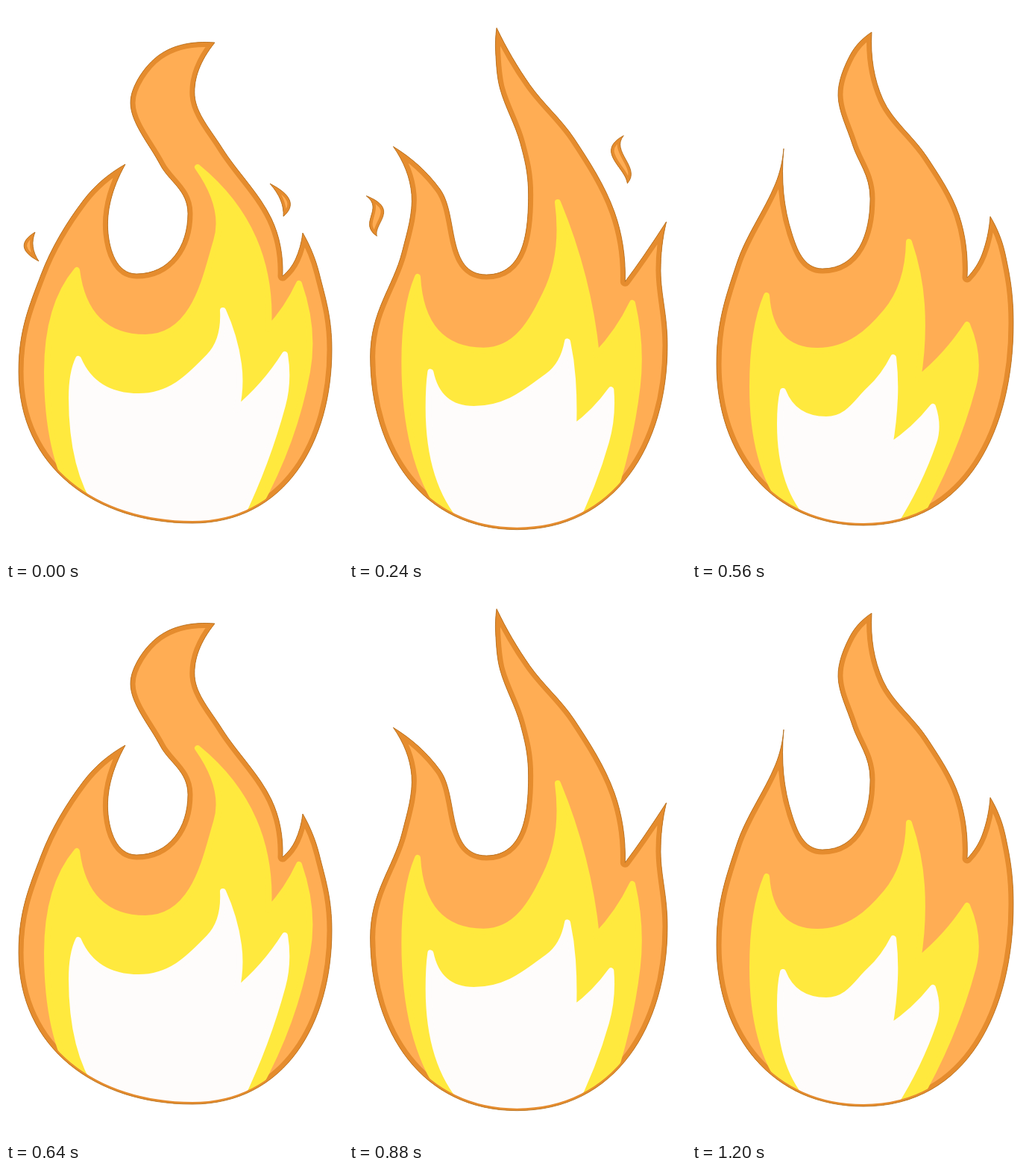
Recreate the animation shown at these times as an HTML page with a canvas. Size 452 px wide and 741 px high, loop 1.28 s.

```html
<!DOCTYPE html>
<html lang="en">
<head>
<meta charset="utf-8">
<title>Flame</title>
<style>
  html, body { margin: 0; width: 100%; height: 100%; overflow: hidden; background: #fff; }
  canvas { display: block; }
</style>
</head>
<body>
<canvas id="stage" width="452" height="741"></canvas>
<script>
const ctx = document.getElementById("stage").getContext("2d");
const STEP = 80, LOOP = 16, FLICKER = 8;
const ORANGE = "#ffad54", DARK = "#e58c2e", EDGE = "#b06c1f", YELLOW = "#ffe93e", WHITE = "#fefcfb";

// Key points "x,y" of a shape. "|" follows a sharp corner;
// "v" and "h" make the curve run vertically or horizontally there.
const parse = text => text.split("|").map(run => run.trim().split(/\s+/).map(token => {
  const [, axis, x, y] = token.match(/([vh]?)(\d+),(\d+)/);
  return { x: +x, y: +y, axis };
}));
const pose = (step, ...shapes) => ({ step, shapes: shapes.map(parse) });

// Body, yellow and white at the main moments of a flicker
const flame = [
  pose(0,
    `280,49 253,120 289,189 356,285 371,362 | 388,340 398,304
     | 420,358 v437,460 h250,693 v17,490 47,360 104,260 160,212
     | 137,305 h175,359 v244,278 207,213 167,130 205,66 280,49`,
    "93,662 v55,490 95,354 | h187,444 282,315 257,216 | 332,312 352,433 | 393,372 | 404,490 338,672",
    "126,675 v88,525 97,473 | h178,523 272,470 291,408 | 312,480 309,541 | 374,467 | 371,535 315,685"),
  pose(2,
    `228,16 245,116 300,187 356,285 371,376 | 393,341 418,282
     | 419,345 v426,440 h228,699 v31,460 70,335 88,255 80,185
     | 132,252 h190,366 v238,262 226,195 201,115 209,56 228,16`,
    "118,668 v70,455 87,355 | h186,464 264,385 280,247 | 320,350 338,462 | 382,389 | 388,500 350,672",
    "150,685 v103,530 105,485 | h165,535 269,493 296,442 | 305,492 308,563 | 361,511 | 351,580 296,700"),
  pose(5,
    `138,56 237,84 305,157 356,258 369,356 | 399,323 441,303
     | 416,375 v429,485 h220,707 v24,490 74,318 76,247 18,195
     | 102,232 h173,348 v246,235 237,160 206,103 172,73 138,56`,
    "140,700 v83,520 102,379 | h170,457 262,388 280,295 | 302,395 320,478 | 376,416 | 384,530 340,690",
    "165,705 v114,555 118,501 | h172,550 262,501 287,465 | 290,515 287,570 | 332,521 | 333,590 303,705"),
  pose(7,
    `241,35 256,125 315,202 358,280 369,364 | 389,333 400,282
     | 420,332 v431,425 h230,696 v33,480 60,345 112,238 123,191
     | 134,305 h175,352 v239,258 215,185 196,120 212,66 241,35`,
    "125,672 v81,510 100,388 | h168,462 260,410 291,316 | 308,400 303,500 | 369,427 | 377,510 296,700",
    "162,690 v118,560 122,516 | h180,554 238,514 270,471 | 272,525 265,590 | 323,537 | 324,585 266,702")
];

// Top and bottom of the right and the left spark
const sparks = [
  pose(0, "354,238 372,282", "39,303 44,342"),
  pose(2, "370,181 376,262", "25,260 42,327"),
  pose(5, "365,159 368,189", "19,243 28,271")
];

const mix = (a, b, k) => a + (b - a) * k;
const clamp = v => Math.max(-1, Math.min(1, v));

function shapesAt(poses, step) {
  const next = poses.findIndex(p => p.step >= step);
  if (next < 0) return [];
  const b = poses[next], a = poses[Math.max(0, next - 1)];
  const k = a === b ? 0 : (step - a.step) / (b.step - a.step);
  return a.shapes.map((shape, s) => shape.map((run, r) => run.map((p, i) => {
    const q = b.shapes[s][r][i];
    return { x: mix(p.x, q.x, k), y: mix(p.y, q.y, k), axis: p.axis };
  })));
}

const dist = (p, q) => Math.hypot(q.x - p.x, q.y - p.y);
const slope = (p, q, len = dist(p, q)) => ({ x: (q.x - p.x) / len, y: (q.y - p.y) / len });

function tangent(prev, p, next) {
  if (p.axis === "v") return { x: 0, y: 1.25 * Math.sign(next.y - prev.y) };
  if (p.axis === "h") return { x: 1.25 * Math.sign(next.x - prev.x), y: 0 };
  return slope(prev, next, dist(prev, p) + dist(p, next));
}

function addRun(path, pts) {
  const n = pts.length - 1;
  if (n === 1) { // slightly sagging line
    const [p, q] = pts;
    path.quadraticCurveTo((p.x + q.x) / 2 + (p.y - q.y) * 0.08,
      (p.y + q.y) / 2 + (q.x - p.x) * 0.08, q.x, q.y);
    return;
  }
  const tan = pts.map((p, i) => i > 0 && i < n ? tangent(pts[i - 1], p, pts[i + 1]) : null);
  const end = (u, t) => ({ x: 2 * u.x - t.x, y: 2 * u.y - t.y });
  tan[0] = end(slope(pts[0], pts[1]), tan[1]);
  tan[n] = end(slope(pts[n - 1], pts[n]), tan[n - 1]);
  for (let i = 0; i < n; i++) {
    const p = pts[i], q = pts[i + 1], h = dist(p, q) / 3;
    path.bezierCurveTo(p.x + tan[i].x * h, p.y + tan[i].y * h,
      q.x - tan[i + 1].x * h, q.y - tan[i + 1].y * h, q.x, q.y);
  }
}

function outline(shape) {
  const path = new Path2D(), first = shape[0][0];
  let last;
  path.moveTo(first.x, first.y);
  for (const run of shape) {
    addRun(path, last ? [last, ...run] : run);
    last = run[run.length - 1];
  }
  // Open shapes reach below the body, which clips them
  if (dist(first, last) > 0) {
    path.lineTo(last.x, 760);
    path.lineTo(first.x, 760);
  }
  path.closePath();
  return path;
}

// A crescent that turns into an S and then into the opposite crescent
function sparkPath([[top, bottom]], side, step) {
  const path = new Path2D();
  const upper = clamp(1 - step), lower = clamp((3.5 - step) / 1.5);
  const twist = (lower - upper) / 2;
  const bend = side * (15 + 23 * twist), half = 8 + 4 * twist;
  const x = (k, sway, w) => mix(top.x, bottom.x, k) + bend * sway + w;
  const y1 = mix(top.y, bottom.y, 1 / 3), y2 = mix(top.y, bottom.y, 2 / 3);
  path.moveTo(top.x, top.y);
  path.bezierCurveTo(x(1 / 3, upper, half), y1, x(2 / 3, lower, half), y2, bottom.x, bottom.y);
  path.bezierCurveTo(x(2 / 3, lower, -half), y2, x(1 / 3, upper, -half), y1, top.x, top.y);
  path.closePath();
  return path;
}

function fill(path, color) {
  ctx.fillStyle = color;
  ctx.fill(path);
}

function stroke(path, color, width) {
  ctx.strokeStyle = color;
  ctx.lineWidth = width;
  ctx.stroke(path);
}

function drawBlob(path, rim, layers = []) {
  fill(path, ORANGE);
  ctx.save();
  ctx.clip(path);
  stroke(path, DARK, rim);
  layers.forEach((shape, i) => {
    const layer = outline(shape), color = [YELLOW, WHITE][i];
    fill(layer, color);
    stroke(layer, color, 8); // rounds the peaks
  });
  stroke(path, DARK, 6);
  ctx.restore();
  stroke(path, EDGE, 0.8);
}

function draw(now) {
  const step = Math.floor(now / STEP) % LOOP;
  ctx.clearRect(0, 0, 452, 741);
  const [body, ...layers] = shapesAt(flame, step % FLICKER);
  drawBlob(outline(body), 13, layers);
  shapesAt(sparks, step).forEach((ends, i) => drawBlob(sparkPath(ends, i ? -1 : 1, step), 8));
}

const start = performance.now();
function tick() {
  draw(performance.now() - start);
  requestAnimationFrame(tick);
}
ctx.lineJoin = "round";
tick();
</script>
</body>
</html>
```
